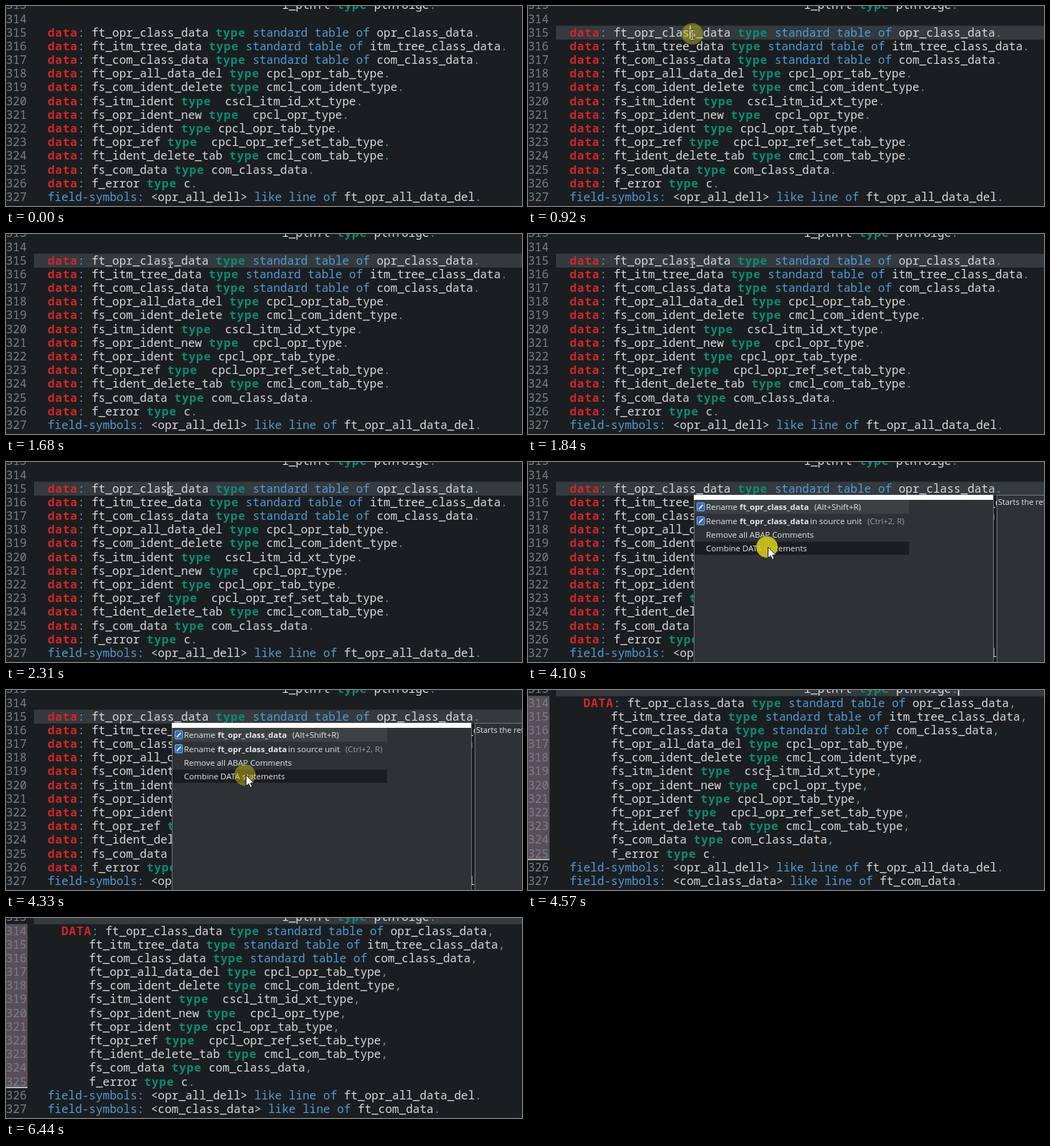
These frames come from a looping animation (719 px wide and 280 px high, 6530 ms). An HTML page:

```html
<!DOCTYPE html>
<html lang="en">
<head>
<meta charset="utf-8">
<title>Combine DATA statements</title>
<style>
  html, body { margin: 0; width: 100%; height: 100%; overflow: hidden; background: #1b1e20; }
  svg { display: block; width: 719px; height: 280px; }
  text { white-space: pre; }
  .code { font: 16px "Noto Sans Mono", "DejaVu Sans Mono", monospace; fill: #d6d8da; }
  .num { fill: #74828a; }
  .decl, .type { font-weight: 700; letter-spacing: .9px; }
  .decl { fill: #d3262a; }
  .type { fill: #0e8b76; }
  .word { fill: #509bd5; }
  .ui { font: 11.4px "Open Sans", "Noto Sans", sans-serif; fill: #e6e7e8; }
  .ui .b { font-weight: 700; }
  .ui .dim { fill: #9a9ea1; }
</style>
</head>
<body>
<svg viewBox="0 0 719 280">
  <rect width="719" height="280" fill="#1b1e20"/>
  <rect id="band" x="39" width="680" height="19.4" fill="#343a3e"/>
  <g id="before" class="code"></g>
  <g id="after" class="code"></g>
  <rect id="caret" width="1.6" height="19" fill="#eceeef"/>

  <g id="popup" class="ui">
    <rect x="231" y="46" width="418" height="240" fill="#6d7174"/>
    <rect x="232" y="46" width="416" height="240" fill="#2e3236"/>
    <rect x="231" y="46" width="417" height="7" fill="#fdfdfd"/>
    <rect x="232" y="53" width="299" height="19.5" fill="#3b4043"/>
    <rect id="hover" x="232" y="111.5" width="299" height="18.5" fill="#1b1d20"/>
    <g id="icons"></g>
    <text y="67"><tspan x="248">Rename</tspan><tspan x="295" class="b">ft_opr_class_data</tspan><tspan x="399">(Alt+Shift+R)</tspan></text>
    <text y="86.5"><tspan x="248">Rename</tspan><tspan x="295" class="b">ft_opr_class_data</tspan><tspan x="393">in source unit</tspan><tspan x="473" class="dim">(Ctrl+2, R)</tspan></text>
    <text x="248" y="105.5">Remove all ABAP Comments</text>
    <text x="248" y="125">Combine DATA statements</text>
  </g>
  <g id="info" class="ui">
    <rect x="653.5" y="46.5" width="80" height="250" fill="#2e3236" stroke="#70757a"/>
    <text x="655" y="60" style="font-size:11px">Starts the refactoring</text>
  </g>

  <circle id="click" r="15" fill="#cfc41a"/>
  <g id="beam" fill="none">
    <path id="beamEdge" stroke="#111" stroke-width="2.6"/>
    <path id="beamLine" stroke="#f2f2f2" stroke-width="1.2"/>
  </g>
  <path id="arrow" d="M0 0V15.5L3.6 12.2L6 17.6L8.6 16.4L6.2 11.2H11Z" fill="#fff" stroke="#111" stroke-width="1"/>
</svg>
<script>
const LOOP = 6530, PITCH = 19.17;
const $ = id => document.getElementById(id);
const rowTop = n => 27.6 + (n - 315) * PITCH;

const head = ' '.repeat(34) + 'l_ptnft type ptnfolge.';
const vars = [
  'ft_opr_class_data type standard table of opr_class_data',
  'ft_itm_tree_data type standard table of itm_tree_class_data',
  'ft_com_class_data type standard table of com_class_data',
  'ft_opr_all_data_del type cpcl_opr_tab_type',
  'fs_com_ident_delete type cmcl_com_ident_type',
  'fs_itm_ident type  cscl_itm_id_xt_type',
  'fs_opr_ident_new type  cpcl_opr_type',
  'ft_opr_ident type cpcl_opr_tab_type',
  'ft_opr_ref type  cpcl_opr_ref_set_tab_type',
  'ft_ident_delete_tab type cmcl_com_tab_type',
  'fs_com_data type com_class_data',
  'f_error type c'
];
const symbols = (name, table) => `field-symbols: <${name}> like line of ${table}.`;
const oprSymbols = symbols('opr_all_dell', 'ft_opr_all_data_del');
const comSymbols = symbols('com_class_data', 'ft_com_data');

const before = [head, '', ...vars.map(v => `data: ${v}.`), oprSymbols];
const after = [head,
  ...vars.map((v, i) => (i ? ' '.repeat(6) : '  DATA: ') + v + (i < vars.length - 1 ? ',' : '.')),
  oprSymbols, comSymbols];

function add(parent, tag, attrs, text) {
  const el = document.createElementNS('http://www.w3.org/2000/svg', tag);
  for (const k in attrs) el.setAttribute(k, attrs[k]);
  if (text) el.textContent = text;
  return parent.appendChild(el);
}

const TOKEN = /(\bdata(?=:)|\btype\b|\bfield-symbols\b|\b(?:standard|table|of|like|line)\b|[.,:])/i;
function tokenClass(s) {
  if (/^data$/i.test(s)) return 'decl';
  return s === 'type' ? 'type' : 'word';
}

function writeCode(group, lines) {
  lines.forEach((line, i) => {
    const n = 313 + i, y = rowTop(n) + 15.2;
    add(group, 'text', { x: 0, y, class: 'num' }, String(n));
    const row = add(group, 'text', { x: 58, y });
    line.split(TOKEN).forEach((s, k) => {
      if (s) add(row, 'tspan', k % 2 ? { class: tokenClass(s) } : {}, s);
    });
  });
}

// Gutter marks for the changed lines
add($('after'), 'rect', { y: rowTop(314), width: 30, height: 12 * PITCH, fill: '#594d59' });
add($('after'), 'rect', { y: 236.6, width: 30, height: 1.4, fill: '#d5d3d6' });
writeCode($('before'), before);
writeCode($('after'), after);

for (const y of [57, 76.5]) {
  add($('icons'), 'rect', { x: 235.5, y, width: 10.5, height: 11.5, rx: 1.5, fill: '#2f6cc4', stroke: '#a9c3ea', 'stroke-width': .8 });
  add($('icons'), 'path', { d: `M238 ${y + 9}L243.5 ${y + 3}`, stroke: '#fff', 'stroke-width': 1.8 });
}

const beamPath = 'M-3.5 -6.5H-1L0 -5.5L1 -6.5H3.5M0 -5.5V5.5M-3.5 6.5H-1L0 5.5L1 6.5H3.5';
$('beamEdge').setAttribute('d', beamPath);
$('beamLine').setAttribute('d', beamPath);

// start, end, steps, from, to
const moves = [
  [70, 690, 8, [464, 220], [229, 40.5]],
  [3160, 3490, 4, [229, 40.5], [334.5, 119]],
  [5420, 5810, 5, [334.5, 119], [687, 267]]
];
const clicks = [[760, 229, 39], [4100, 333, 119]];
const caretOn = [[760, 1610], [2140, 2610], [3160, 3720], [4570, 5120], [5650, 6290]];

const within = (t, a, b) => t >= a && t < b;
const show = (id, on) => $(id).setAttribute('visibility', on ? 'visible' : 'hidden');
const place = (id, x, y) => $(id).setAttribute('transform', `translate(${x} ${y})`);
const ease = p => p * p * (3 - 2 * p);

function pointer(t) {
  let pos = moves[0][3];
  for (const [start, end, steps, from, to] of moves) {
    if (t < start) break;
    const p = Math.min(1, Math.floor((t - start) / (end - start) * steps) / steps);
    pos = from.map((v, i) => v + (to[i] - v) * ease(p));
  }
  return pos;
}

function draw(t) {
  const done = t >= 4490, popup = within(t, 2380, 4340);
  show('before', !done);
  show('after', done);
  show('band', t >= 760);
  $('band').setAttribute('y', rowTop(done ? 313 : 315));

  show('caret', caretOn.some(([a, b]) => within(t, a, b)));
  $('caret').setAttribute('x', done ? 599.2 : 225);
  $('caret').setAttribute('y', done ? -11 : 27.5);

  const [x, y] = pointer(t);
  const inPopup = popup && y > 50;
  const seen = within(t, 70, 5810);
  show('popup', popup);
  show('hover', popup && y > 111);
  show('info', within(t, 2930, 4340));
  show('beam', seen && !inPopup);
  show('arrow', seen && inPopup);
  place('beam', x, y);
  place('arrow', x, y);

  const hit = clicks.find(([s]) => within(t, s, s + 310));
  show('click', hit);
  if (hit) {
    place('click', hit[1], hit[2]);
    const step = Math.floor((t - hit[0]) / 77.5);
    $('click').setAttribute('opacity', .92 * (1 - step / 4));
  }
}

const born = performance.now();
function tick() {
  draw((performance.now() - born) % LOOP);
  requestAnimationFrame(tick);
}
tick();
</script>
</body>
</html>
```
